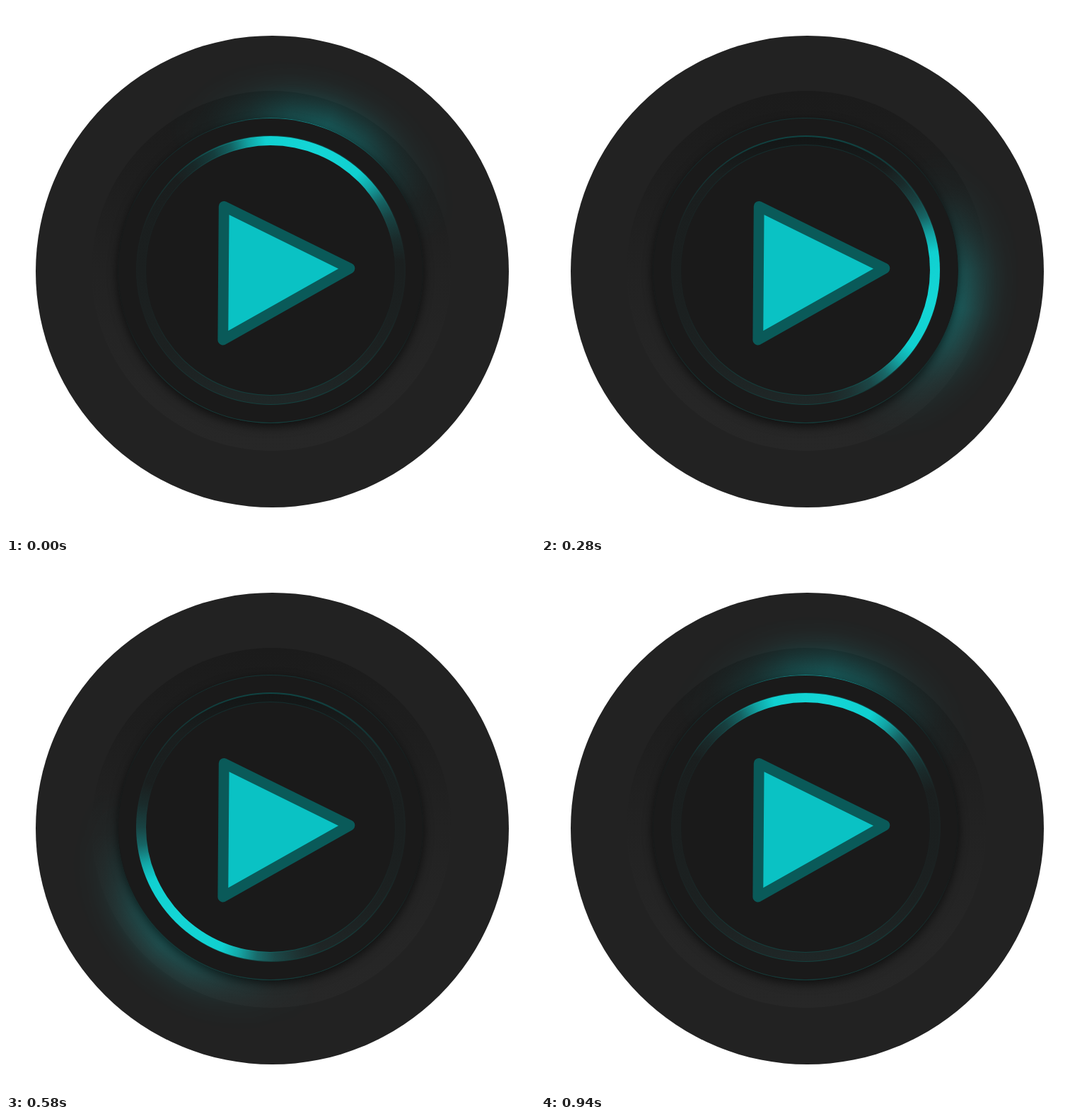
Animation of 748x748 px, one loop 0.97 s. Source, as an HTML page:

```html
<!DOCTYPE html>
<html lang="en">
<head>
<meta charset="utf-8">
<title>Play button</title>
<style>
  html, body { margin: 0; width: 100%; height: 100%; overflow: hidden; background: #fff; }
  #stage { --angle: 20deg; position: relative; width: 748px; height: 748px; overflow: hidden; }
  #stage div {
    position: absolute; border-radius: 50%;
    left: calc(var(--x, 374px) - var(--r)); top: calc(var(--y, 374px) - var(--r));
    width: calc(2 * var(--r)); height: calc(2 * var(--r));
  }
  svg { position: absolute; inset: 0; }

  .plate { --r: 334.6px; --x: 376.8px; --y: 375.3px; background: #222; scale: 1 .997; }
  .dish  { --r: 254.5px; --x: 375px; --y: 374.5px; background: linear-gradient(#1b1b1b, #1e1e1e 25%, #222 50%, #252525 75%, #272727); }
  .glow, .edge-light {
    background: conic-gradient(from calc(var(--angle) - 60deg),
      #10cccc00, #10cccc1a 16deg, #10cccc66 32deg, #10cccccc 46deg, #10cccc 60deg,
      #10cccccc 74deg, #10cccc66 88deg, #10cccc1a 104deg, #10cccc00 120deg);
  }
  .glow {
    --r: 300px; --x: 379px; opacity: .34;
    mask-image: radial-gradient(closest-side, #000 72%, #000b 77%, #0007 82%, #0003 88%, #0001 93%, #0000);
  }
  .collar { --r: 216px; background: linear-gradient(#143434, #161a1a 35%, #161a1a 65%, #12403e); box-shadow: 0 5px 14px #0009; }
  .edge-light { --r: 216px; opacity: .6; mask-image: linear-gradient(#000, #0000 32%); }
  .face { background: #1a1a1a; }
  .inner { --y: 373.6px; }
  .rim { background: linear-gradient(var(--top), #1b2121 35%, #1b2121 65%, #14403e); }
  .groove { --r: 189px; background: linear-gradient(#131616, #1a1e1e 15%, #1b1f1f 50%, #1c2121 80%, #1f2727); }
  .arc {
    --r: 189.7px;
    background: conic-gradient(from calc(var(--angle) - 66deg),
      #10d0d000, #10d0d012 10deg, #10d0d033 20deg, #10d0d066 28deg, #10d0d0c0 36deg, #10d0d0 44deg, #14d6d6 66deg,
      #10d0d0 88deg, #10d0d0c0 96deg, #10d0d066 104deg, #10d0d033 112deg, #10d0d012 122deg, #10d0d000 132deg);
  }
</style>
</head>
<body>
<div id="stage">
  <div class="plate"></div>
  <div class="dish"></div>
  <div class="glow"></div>
  <div class="collar"></div>
  <div class="edge-light"></div>
  <div class="face" style="--r: 214.7px"></div>
  <div class="inner rim" style="--r: 190.5px; --top: #0f4443"></div>
  <div class="inner groove"></div>
  <div class="inner rim" style="--r: 177.2px; --top: #142e2e"></div>
  <div class="inner arc"></div>
  <div class="inner face" style="--r: 176.2px"></div>
  <svg width="748" height="748">
    <path d="M308.2 283.3 486 371 306.8 472Z" fill="#0ac2c4" stroke="#0a5a59" stroke-width="14.8" stroke-linejoin="round"/>
  </svg>
</div>
<script>
  const LOOP = 970, HOLD = 100, STEP = 30;
  const stage = document.getElementById('stage');
  const start = performance.now();

  // The light turns 12 degrees per step, after a longer first hold.
  function draw() {
    const time = (performance.now() - start) % LOOP;
    const step = time < HOLD ? 0 : 1 + Math.floor((time - HOLD) / STEP);
    stage.style.setProperty('--angle', `${20 + 12 * step}deg`);
    requestAnimationFrame(draw);
  }
  draw();
</script>
</body>
</html>
```
